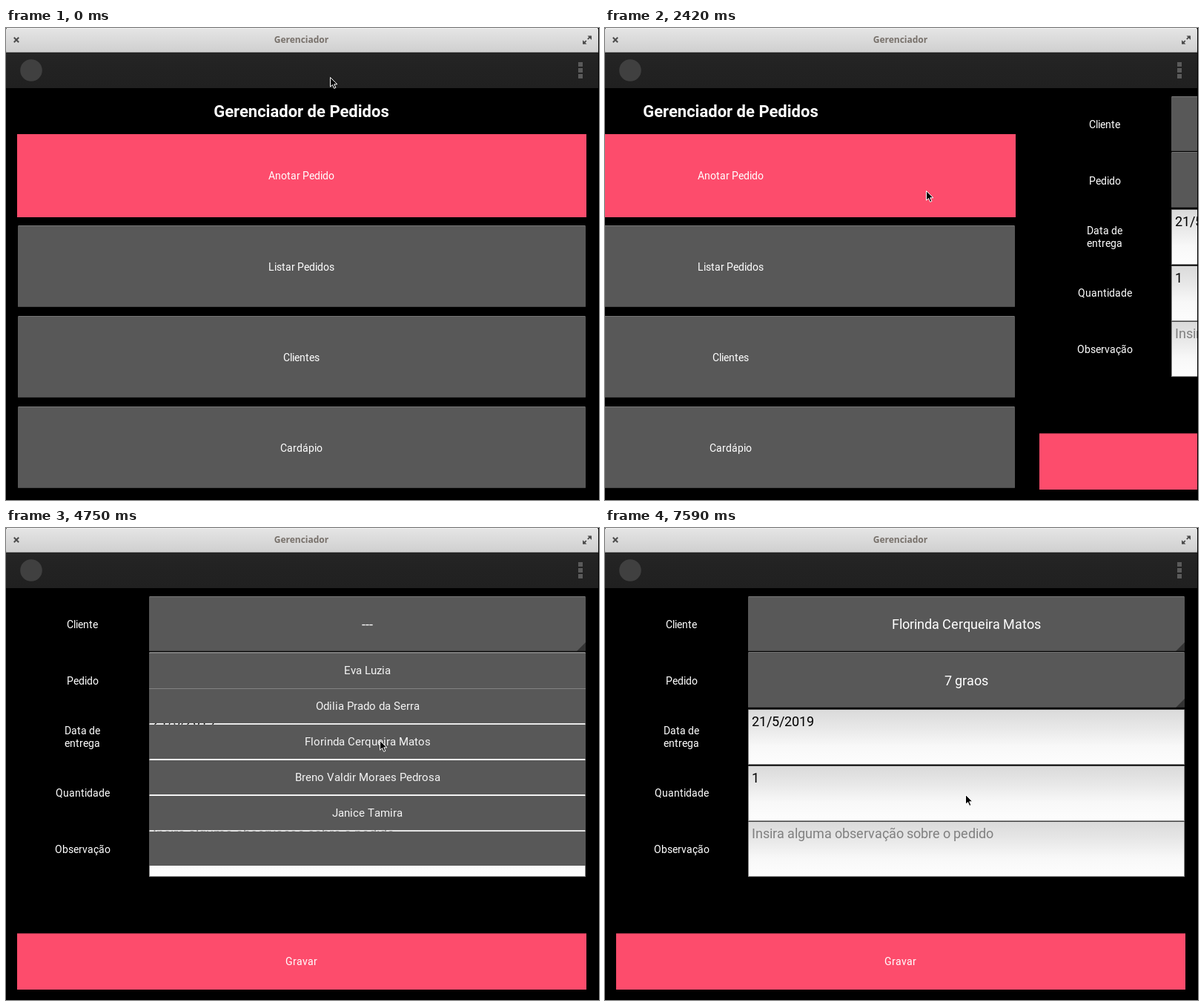
An HTML page for the animation above (8 s loop, 800 by 636 pixels).

```html
<!DOCTYPE html>
<html lang="pt">
<head>
<meta charset="utf-8">
<title>Gerenciador</title>
<style>
  html, body { margin: 0; width: 100%; height: 100%; overflow: hidden; background: #000; }
  svg { display: block; }
  text { font-family: Roboto, sans-serif; white-space: pre; }
</style>
</head>
<body>
<svg id="stage" width="800" height="636" viewBox="0 0 800 636"></svg>
<script>
const LOOP = 8000;
const PINK = '#fd4c6c', NAVY = '#323157', BLUE = '#32a4ce', GREY = '#585858';
const CLIENT = 'Florinda Cerqueira Matos', ORDER = '7 graos';
const CLIENTS = ['Eva Luzia', 'Odilia Prado da Serra', CLIENT,
  'Breno Valdir Moraes Pedrosa', 'Janice Tamira', ''];
const ORDERS = ['Frances', 'Integral', ORDER, 'Centeio', ''];

const pen = document.createElement('canvas').getContext('2d');

// Glyphs advance by whole pixels, as in the toolkit's hinted text.
function label(str, x, y, size = 14, fill = '#fff', centred = true) {
  pen.font = `${size}px Roboto, sans-serif`;
  const steps = [...str].map(c => Math.round(pen.measureText(c).width));
  let at = centred ? Math.round(x - steps.reduce((a, b) => a + b, 0) / 2) : x;
  const xs = steps.map(step => (at += step) - step);
  return `<text x="${xs.join(' ')}" y="${y}" font-size="${size}" fill="${fill}">${str}</text>`;
}

const rect = (x, y, w, h, fill, more = '') =>
  `<rect x="${x}" y="${y}" width="${w}" height="${h}" fill="${fill}" ${more}/>`;

const button = (x, y, w, h, fill = GREY) =>
  rect(x, y, w, h, fill, 'rx="1"') +
  rect(x + 1, y, w - 2, 1, '#fff', 'opacity=".18"') +
  rect(x + 1, y + h - 1, w - 2, 1, '#000', 'opacity=".2"');

const spinner = (y, h, fill) => button(193, y, 589, h, fill) +
  `<path d="M782 ${y + h - 12}v12h-12z" fill="#000" opacity=".42"/>`;

// A grey frame around the paper, with a dark upper edge.
const field = (y, str, fill) =>
  rect(193, y, 589, 75, '#8c8c8c') +
  rect(193, y, 589, 1, '#4a4a4a') +
  rect(194, y + 1, 587, 73, 'url(#paper)') +
  label(str, 198, y + 23, 18, fill, false);

const group = (id, body) => `<g id="${id}">${body}</g>`;

const dropdown = (id, top, items) => group(id, items.map((item, i) => {
  const y = top + i * 48;
  return rect(193, y + 1, 589, 46, GREY) +
    rect(193, y, 589, 1, '#fff', 'opacity=".25"') +
    label(item, 487.5, y + 29, 15, '#f4f4f4');
}).join(''));

const gradient = (id, ...colours) =>
  `<linearGradient id="${id}" x2="0" y2="1">` + colours.map((c, i) =>
    `<stop offset="${i / (colours.length - 1)}" stop-color="${c}"/>`).join('') +
  '</linearGradient>';

const menu =
  `<text x="398.5" y="120" font-size="22" font-weight="700" fill="#fff" text-anchor="middle">Gerenciador de Pedidos</text>` +
  group('noteIdle', rect(15, 143, 768, 112, PINK)) +
  group('noteDown', button(16, 143, 766, 111, NAVY)) +
  label('Anotar Pedido', 398.5, 204) +
  ['Listar Pedidos', 'Clientes', 'Cardápio'].map((name, i) =>
    button(16, 266 + i * 122, 766, 110) + label(name, 398.5, 327 + i * 122)).join('');

const form =
  label('Cliente', 103, 135) + label('Pedido', 103.5, 211) +
  label('Data de', 103, 278) + label('entrega', 103, 295) +
  label('Quantidade', 103.5, 362) + label('Observação', 103.5, 438) +
  group('clientIdle', spinner(92, 74, GREY)) +
  group('clientDown', spinner(92, 74, BLUE)) +
  group('clientNone', label('---', 487.5, 136, 18)) +
  group('clientSet', label(CLIENT, 487.5, 136, 18)) +
  spinner(167, 75, GREY) +
  group('orderNone', label('---', 487.5, 212, 18)) +
  group('orderSet', label(ORDER, 487.5, 212, 18)) +
  field(244, '21/5/2019', '#000') +
  field(320, '1', '#000') +
  field(395, 'Insira alguma observação sobre o pedido', '#808080') +
  rect(15, 546.3, 768, 75.7, PINK) + label('Gravar', 398.5, 589) +
  dropdown('clientList', 168, CLIENTS) +
  dropdown('orderList', 243, ORDERS);

const chrome =
  rect(0, 0, 799, 33, 'url(#title)', 'rx="2"') +
  rect(1, 0, 797, 1, '#f2f2f2') +
  rect(0, 32, 799, 1, '#aaa') +
  `<path d="M10.8 12.8l6.4 6.4m0-6.4l-6.4 6.4" stroke="#4c4c4c" stroke-width="2"/>
   <path d="M784.8 15.2l4-4m-6 6l-4 4" stroke="#4c4c4c" stroke-width="1.8"/>
   <path d="M784.5 10.5h5.5v5.5zM778 16.2v5.5h5.5z" fill="#4c4c4c"/>
   <text x="398.5" y="20" font-size="12" font-weight="700" fill="#77706a" text-anchor="middle" style="font-family:'Open Sans',sans-serif">Gerenciador</text>` +
  rect(0, 33, 799, 48, 'url(#bar)') +
  '<circle cx="34" cy="57" r="14.8" fill="#404040"/>' +
  [46, 54, 62].map(y => rect(772, y, 6, 6, '#5a5a5a')).join('');

const stage = document.getElementById('stage');
stage.innerHTML =
  `<defs>${gradient('title', '#e5e5e5', '#cfcfcf')}${gradient('bar', '#252525', '#222', '#202020')}` +
  `${gradient('paper', '#dadada', '#e8e8e8', '#f8f8f8', '#fdfdfd')}` +
  `<clipPath id="view">${rect(0, 81, 799, 555, '#000')}</clipPath></defs>` +
  rect(0, 0, 800, 636, '#000') +
  `<g clip-path="url(#view)">${group('menu', menu)}${group('form', form)}</g>` + chrome +
  `<path id="cursor" d="M.5 .5V13.2l3-2.7 2.2 4.9 2.2-1-2.2-4.6h4.2z" fill="#000" stroke="#fff"/>`;

const el = {};
stage.querySelectorAll('[id]').forEach(node => el[node.id] = node);

// Cursor moves: start, end, then the resting point.
const MOVES = [
  [710, 1130, 433, 219],
  [2800, 3380, 446, 133],
  [3990, 4750, 504, 286],
  [5190, 5800, 514, 202],
  [6440, 7260, 486, 357],
  [7330, 7380, 486, 359],
];

const clamp = v => Math.min(1, Math.max(0, v));
const easeInOut = p => (1 - Math.cos(Math.PI * p)) / 2;
const outQuad = p => 1 - (1 - p) ** 2;

function cursorAt(t) {
  let x = 437, y = 66;
  for (const [start, end, toX, toY] of MOVES) {
    const p = easeInOut(clamp((t - start) / (end - start)));
    x += (toX - x) * p;
    y += (toY - y) * p;
  }
  return [Math.round(x), Math.round(y)];
}

function show(id, on) {
  el[id].style.display = on ? '' : 'none';
}

function swap(offId, onId, on) {
  show(offId, !on);
  show(onId, on);
}

function render(t) {
  const within = (from, to) => t >= from && t < to;
  const slide = Math.round(800 * outQuad(clamp((t - 2359) / 400)));
  el.menu.setAttribute('transform', `translate(${-slide})`);
  el.form.setAttribute('transform', `translate(${800 - slide})`);
  swap('noteIdle', 'noteDown', within(2210, 2359));
  swap('clientIdle', 'clientDown', within(3550, 3960));
  swap('clientNone', 'clientSet', t >= 5050);
  swap('orderNone', 'orderSet', t >= 7590);
  show('clientList', within(3960, 5050));
  show('orderList', within(6090, 7590));
  el.cursor.setAttribute('transform', `translate(${cursorAt(t)})`);
}

const began = performance.now();
function tick() {
  render((performance.now() - began) % LOOP);
  requestAnimationFrame(tick);
}
tick();
</script>
</body>
</html>
```
